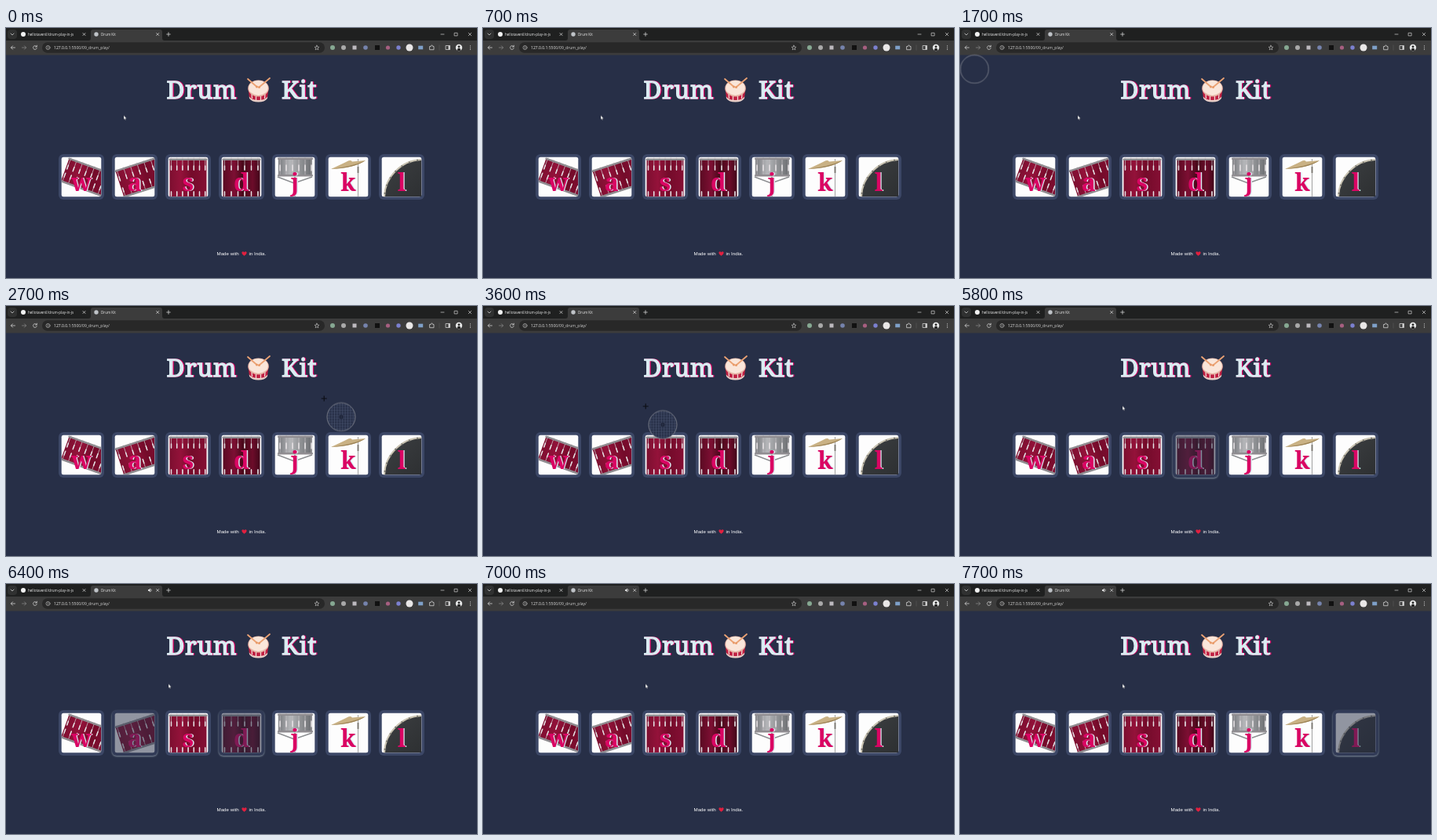
Recreate the animation shown at these times as an HTML page. Size 600 by 319 pixels, loop 8000 ms.

```html
<!DOCTYPE html>
<html lang="en">
<head>
<meta charset="utf-8">
<title>Drum Kit</title>
<style>
html, body { margin: 0; width: 100%; height: 100%; overflow: hidden; background: #272f47; }
svg { display: block; }
#stage { width: 100vw; height: 100vh; }
.ui { font-family: "Open Sans", "Noto Sans", sans-serif; font-size: 4.55px; fill: #ececec; }
.line { fill: none; stroke: #d0d0d0; stroke-width: .8; stroke-linecap: round; stroke-linejoin: round; }
.slab { font-family: "Noto Serif", serif; font-size: 31.5px; letter-spacing: .5px; stroke-width: 1.3; }
.light { fill: #dbedf3; stroke: #dbedf3; }
.pink { fill: #da0463; stroke: #da0463; }
.letter { font-family: "Noto Serif", serif; font-size: 30.5px; font-weight: 700; text-anchor: middle; }
.foot { font: 6.2px "Liberation Sans", Arial, sans-serif; fill: #fff; }

#arrow, #loupe, #cross, #grid, #speaker { animation: 8s infinite; }
#arrow { animation-name: arrow; animation-timing-function: step-end; }
#loupe { animation-name: loupe-show, loupe-move; animation-timing-function: step-end, linear; }
#cross, #grid { animation-name: pick; animation-timing-function: step-end; }
#speaker { animation-name: sound; animation-timing-function: step-end; }

@keyframes arrow {
  0% { transform: translate(150px, 111.5px); opacity: 1; }
  27.5% { transform: translate(207px, 127.5px); opacity: 0; }
  47.5%, 100% { transform: translate(207px, 127.5px); opacity: 1; }
}
@keyframes loupe-show { 0%, 47.5%, 100% { opacity: 0; } 21.25% { opacity: 1; } }
@keyframes loupe-move {
  0% { transform: translate(18.5px, 52.5px); animation-timing-function: step-end; }
  27.5% { transform: translate(310px, 139px); }
  28.75%, 32.5% { transform: translate(439px, 140.5px); }
  33.75% { transform: translate(427.8px, 141.5px); animation-timing-function: ease-out; }
  38.75%, 100% { transform: translate(229px, 151.5px); }
}
@keyframes pick { 0%, 47.5%, 100% { opacity: 0; } 27.5% { opacity: 1; } }
@keyframes sound { 0% { opacity: 0; } 73.75%, 100% { opacity: 1; } }
</style>
</head>
<body>
<svg id="stage" viewBox="0 0 600 319" preserveAspectRatio="none">
  <defs>
    <linearGradient id="red">
      <stop offset="0" stop-color="#7d0f30"/><stop offset=".3" stop-color="#94123a"/>
      <stop offset=".6" stop-color="#740b2a"/><stop offset="1" stop-color="#850f34"/>
    </linearGradient>
    <linearGradient id="wine">
      <stop offset="0" stop-color="#5a0a22"/><stop offset=".3" stop-color="#7d0f33"/>
      <stop offset=".55" stop-color="#470819"/><stop offset=".8" stop-color="#6c0c2a"/>
      <stop offset="1" stop-color="#42071a"/>
    </linearGradient>
    <linearGradient id="steel">
      <stop offset="0" stop-color="#77797d"/><stop offset=".35" stop-color="#b5b6b9"/>
      <stop offset=".7" stop-color="#8b8d90"/><stop offset="1" stop-color="#6c6e72"/>
    </linearGradient>
    <linearGradient id="kick" x2="1" y2="1">
      <stop offset="0" stop-color="#3c3f42"/><stop offset=".6" stop-color="#2a2c2e"/>
    </linearGradient>
  </defs>

  <rect width="600" height="319" fill="#272f47"/>

  <!-- browser window -->
  <rect width="600" height="17" fill="#1f2020"/>
  <rect y="16" width="600" height="18.5" fill="#3c3c3c"/>
  <path d="M105 16q3 0 3-3V5q0-3 3-3h85q3 0 3 3v8q0 3 3 3z" fill="#3c3c3c"/>
  <rect x="2" y="2" width="12" height="12" rx="4" fill="#303131"/>
  <path class="line" d="M6 7l2 2 2-2"/>
  <circle cx="22" cy="8" r="3" fill="#f1f1f1"/>
  <text class="ui" x="28" y="9.7">hellotavenil/drum-play-in-js</text>
  <circle cx="115" cy="8" r="2.7" fill="#bfc3c8"/>
  <text class="ui" x="121" y="9.7">Drum Kit</text>
  <g class="line">
    <path d="M98 6.5l3 3m0-3l-3 3M191.700 6.500l3 3m0-3l-3 3M207 5.700v4.600m-2.300-2.300h4.600"/>
    <path d="M554 8h4M571.500 6.300h3.600v3.600h-3.600zM589.200 6.200l3.600 3.600m0-3.600l-3.600 3.600" stroke-width=".7"/>
  </g>
  <g id="speaker">
    <path d="M181 7h1.200l1.600-1.400v4.800L182.200 9H181z" fill="#d8d8d8"/>
    <path class="line" d="M184.900 6.700q1 1.300 0 2.600" stroke-width=".6"/>
  </g>
  <rect x="46" y="18.300" width="360" height="13.400" rx="6.700" fill="#282828"/>
  <g class="line">
    <path d="M11.500 25h-5m2-2.200L6.300 25l2.200 2.200"/>
    <path d="M20.500 25h5m-2-2.200l2.200 2.200-2.200 2.200" stroke="#858585"/>
    <path d="M39 23.700a2.400 2.400 0 1 0 .3 2M39.300 22.200v1.800h-1.800"/>
    <circle cx="53.500" cy="25" r="2.500" stroke-width=".6"/>
    <path d="M53.500 24.800v1.300m0-2.400v.1" stroke-width=".6"/>
    <path d="M396 22.200l.8 1.900 2.100.2-1.600 1.400.5 2.100-1.800-1.100-1.800 1.100.5-2.100-1.600-1.400 2.100-.2z" stroke-width=".6"/>
    <path d="M540 23.500h1.300q.1-1.500 1.200-1.500t1.200 1.500h1.300v4.200h-5z"/>
    <path d="M560.500 22.500h5v5h-5z"/>
  </g>
  <path d="M563.500 22.500h2v5h-2z" fill="#d0d0d0"/>
  <text class="ui" x="61" y="26.800" style="font-size:5.050px">127.0.0.1<tspan fill="#d2d2d2">:5500/09_drum_play/</tspan></text>
  <circle cx="416" cy="25" r="3" fill="#86a892"/>
  <circle cx="430" cy="25" r="3" fill="#a9a9a9"/>
  <rect x="441.500" y="22.500" width="5" height="5" fill="#bdbabf"/>
  <circle cx="458" cy="25" r="2.800" fill="#7583ad"/>
  <rect x="470" y="22" width="6" height="6" fill="#111"/>
  <circle cx="486.500" cy="25" r="2.600" fill="#a65f80"/>
  <circle cx="500" cy="25" r="2.700" fill="#7b80cf"/>
  <circle cx="514" cy="25" r="4.500" fill="#e9e7e7"/>
  <rect x="525.200" y="22.700" width="6" height="4.600" fill="#7ea0c8"/>
  <path d="M552 21.500v7" stroke="#5c5c5c" stroke-width=".6"/>
  <circle cx="577" cy="25" r="4.200" fill="#e6e7e7"/>
  <path d="M574.600 28.400q.5-2.900 2.400-2.900t2.400 2.900q-2.400 1.400-4.800 0z" fill="#242424"/>
  <circle cx="577" cy="23.800" r="1.400" fill="#242424"/>
  <g fill="#d0d0d0"><circle cx="591.500" cy="22.800" r=".6"/><circle cx="591.500" cy="25" r=".6"/><circle cx="591.500" cy="27.200" r=".6"/></g>

  <!-- heading -->
  <g class="slab">
    <g class="pink" transform="translate(1.300)" aria-hidden="true"><text x="204.500" y="90">Drum</text><text x="351" y="90">Kit</text></g>
    <g class="light"><text x="204.500" y="90">Drum</text><text x="351" y="90">Kit</text></g>
  </g>
  <g transform="translate(321.500 79)">
    <path d="M-13-2l1.500 12q3 5 11.500 5t11.500-5L13-2z" fill="#c01f42"/>
    <path d="M-11.800 8.500q3.500 4.500 11.800 4.500t11.800-4.500l-.4 2.500q-3.500 4.500-11.400 4.500t-11.400-4.500z" fill="#e9cfc8"/>
    <path d="M-8.500 5l.5 6M-3 7v6M3 7v6M8.500 5l-.5 6" stroke="#f1dcd6" stroke-width="1.300"/>
    <ellipse cy="-2" rx="13.300" ry="10.500" fill="#e5b3a4"/>
    <ellipse cy="-2.600" rx="12.200" ry="9.500" fill="#fae6da"/>
    <path d="M-13.500-14L-2-4M14.500-15L1-3.500" stroke="#eba274" stroke-width="1.800" stroke-linecap="round"/>
    <circle cx="-2" cy="-4" r="1.500" fill="#e89a68"/><circle cx="1" cy="-3.500" r="1.500" fill="#e89a68"/>
  </g>

  <g id="keys"></g>

  <text class="foot" x="268.500" y="289.800">Made with</text>
  <path d="M303.500 290.700q-3.200-2.100-3.200-4 0-1.500 1.500-1.500 1.100 0 1.700 1 .6-1 1.700-1 1.500 0 1.500 1.500 0 1.900-3.200 4z" fill="#e0203f"/>
  <text class="foot" x="309.500" y="289.800">in India.</text>

  <!-- colour picker and pointer -->
  <g id="loupe">
    <circle r="18" fill="#272f47"/>
    <g id="grid">
      <path id="mesh" fill="none" stroke="#56607d" stroke-width=".45"/>
      <rect x="-1.700" y="-1.700" width="3.400" height="3.400" fill="none" stroke="#151a28" stroke-width=".7"/>
    </g>
    <circle r="18" fill="none" stroke="#a2a5ab" stroke-width=".65"/>
    <path id="cross" d="M-21.800-27v7m-3.500-3.500h7" stroke="#0b0d13" stroke-width="1.100"/>
  </g>
  <path id="arrow" d="M0 0v5.200l1.200-1 .8 1.800.9-.4-.8-1.700h1.600z" fill="#fff" stroke="#11151f" stroke-width=".3"/>
</svg>
<script>
const range = (n, fn) => Array.from({ length: n }, (_, i) => fn(i)).join("");

// A drum seen from the side: shell, two hoops and a row of lugs.
const drum = (w, h, step, fill, place) => `<g transform="${place}">
  <rect y="2" width="${w}" height="${h - 2}" fill="url(#${fill})"/>
  ${range(Math.floor(w / step) + 1, i => {
    const x = 2 + i * step;
    return `<path d="M${x} 2v14M${x} ${h - 12}v12" stroke="#c9c4c8" stroke-width=".7"/>
      <path d="M${x} 10v5M${x} ${h - 11}v5M${x} 0v2" stroke="#e6e2e5" stroke-width="1.5" stroke-linecap="round"/>`;
  })}
  <rect x="-1" y=".5" width="${w + 2}" height="2.5" rx="1" fill="#8f8c90"/>
  <rect x="-1" y="${h - 1}" width="${w + 2}" height="2.500" rx="1" fill="#8f8c90"/></g>`;

const art = {
  w: drum(60, 32, 8, "red", "translate(10 0) rotate(20)"),
  a: drum(60, 36, 9, "red", "translate(0 16) rotate(-18)"),
  s: drum(47, 54, 7.2, "red", "translate(1.500 1)"),
  d: drum(47, 54, 8.5, "wine", "translate(1.500 1)"),
  j: drum(43, 23, 8, "steel", "translate(4 0)") +
    `<path d="M3 25l21 8 23-8M25 25v25" fill="none" stroke="#8c8e91" stroke-width="1.600"/>`,
  k: `<path d="M37.500 2v48" stroke="#a5a5a5" stroke-width="1.100"/>
    <path d="M37.500 12v8" stroke="#77736d" stroke-width="1.800"/>
    <path d="M3 15Q17 8.500 24 5q4-2 6 .5l17-1.500Q32 14 3 15z" fill="#c9b184"/>
    <path d="M3 15Q29 12 47 4q-13 9.500-44 11z" fill="#9c8356"/>`,
  l: `<circle cx="52" cy="52" r="49" fill="url(#kick)" stroke="#c9c3b2" stroke-width="2"/>
    <circle cx="52" cy="52" r="48.500" fill="none" stroke="#6c6b66" stroke-width="2.500" stroke-dasharray="1.500 9"/>`
};

// Press and release times in ms.
const presses = {
  w: [[4900, 5000], [5400, 5500], [6100, 6200]],
  a: [[5100, 5200], [6000, 6100], [6400, 6500]],
  s: [[5200, 5300], [5500, 5600], [6200, 6300], [6500, 6700]],
  d: [[5300, 5400], [5800, 5900], [6300, 6500]],
  j: [[5900, 6000], [6900, 7000], [7300, 7400]],
  k: [[7100, 7200], [7500, 7600]],
  l: [[7700, 8000]]
};

const up = "{opacity:1;filter:none}";
const down = "{opacity:.5;filter:drop-shadow(0 1.3px .8px #dbedf3)}";
const rules = Object.entries(presses).map(([key, times]) =>
  `@keyframes hit-${key}{0%${up}${times.map(([on, off]) =>
    `${on / 80}%${down}${off / 80}%${up}`).join("")}}
  #key-${key}{animation:hit-${key} 8s step-end infinite}`);
document.head.appendChild(document.createElement("style")).textContent = rules.join("\n");

document.getElementById("keys").innerHTML = Object.keys(art).map((key, i) =>
  `<g transform="translate(${67 + 68 * i} 161)"><g id="key-${key}">
    <rect width="58" height="58" rx="6" fill="#3c4766"/>
    <rect x="3.7" y="3.7" width="50.600" height="50.600" rx="2.500" fill="#fdfdfd"/>
    <svg x="4" y="4" width="50" height="50">${art[key]}</svg>
    <g class="letter"><text x="30.400" y="46.500" fill="#dbedf3" aria-hidden="true">${key}</text>
    <text x="29" y="46.500" fill="#da0463">${key}</text></g>
  </g></g>`).join("");

// Grid lines cut off at the rim of the loupe.
document.getElementById("mesh").setAttribute("d", range(10, i => {
  const p = (i - 4.5) * 3.4, r = Math.sqrt(17.5 ** 2 - p * p);
  return `M${p} ${-r}V${r}M${-r} ${p}H${r}`;
}));
</script>
</body>
</html>
```
